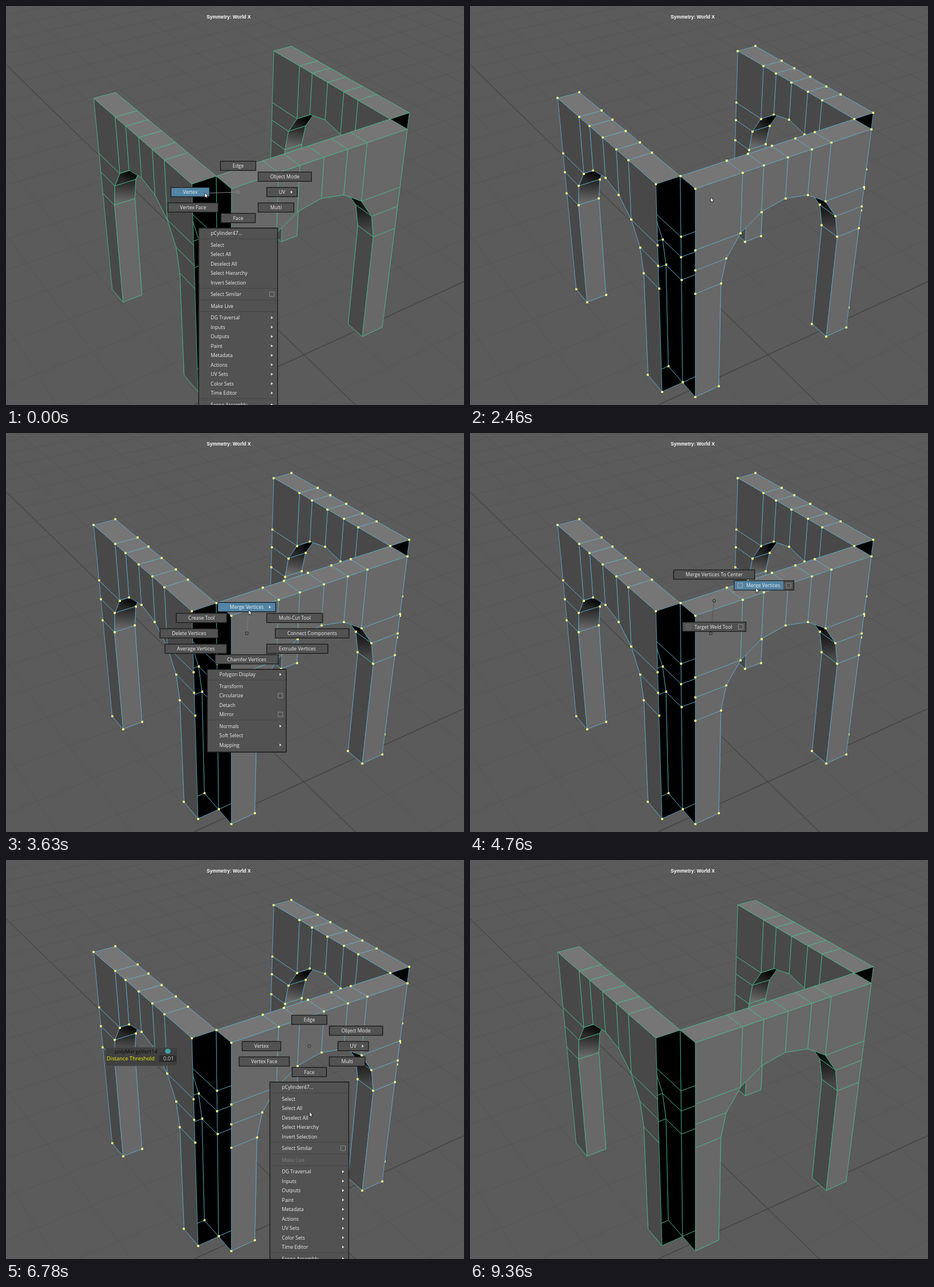
An HTML page with a canvas for the animation above (9.88 s loop, 801x699 px).

```html
<!DOCTYPE html>
<html lang="en">
<head>
<meta charset="utf-8">
<title>Merging vertices</title>
<style>
  html, body { margin: 0; width: 100%; height: 100%; overflow: hidden; background: #5b5b5b; }
  canvas { display: block; }
</style>
</head>
<body>
<canvas id="stage" width="801" height="699"></canvas>
<script>
const ctx = document.getElementById('stage').getContext('2d');
const LOOP = 9880;
const UI_FONT = '"Open Sans", "Noto Sans", sans-serif';
const MENU = '#525252', HOT = '#5285a6';
const grey = level => `rgb(${level},${level},${level})`;

// ---- Drawing helpers ----

function trace(pts, closed) {
  ctx.beginPath();
  pts.forEach(([x, y]) => ctx.lineTo(x, y));
  if (closed) ctx.closePath();
}

function strokeLine(pts, colour, width = 1) {
  trace(pts);
  ctx.strokeStyle = colour;
  ctx.lineWidth = width;
  ctx.stroke();
}

function label(text, x, y, { size = 8.6, colour = '#eee', align = 'left', family = UI_FONT, weight = '' } = {}) {
  ctx.font = `${weight} ${size}px ${family}`;
  ctx.textAlign = align;
  ctx.fillStyle = colour;
  ctx.fillText(text, x, y + size * 0.36);
}

function textWidth(text) {
  ctx.font = `8.6px ${UI_FONT}`;
  return ctx.measureText(text).width;
}

function box(x, y, w, h, fill = MENU) {
  ctx.fillStyle = fill;
  ctx.fillRect(x, y, w, h);
  ctx.strokeStyle = '#191919';
  ctx.lineWidth = 1.3;
  ctx.strokeRect(x, y, w, h);
}

function square(x, y, colour = '#999') {
  ctx.strokeStyle = colour;
  ctx.lineWidth = 0.8;
  ctx.strokeRect(x - 4, y - 4, 8, 8);
}

function arrow(x, y) {
  trace([[x - 1.5, y - 2.6], [x + 1.7, y], [x - 1.5, y + 2.6]], true);
  ctx.fillStyle = '#eee';
  ctx.fill();
}

function ring([x, y], colour = '#222') {
  ctx.beginPath();
  ctx.arc(x, y, 2.6, 0, 7);
  ctx.strokeStyle = colour;
  ctx.lineWidth = 0.9;
  ctx.stroke();
}

// ---- Perspective: an origin plus one vanishing point and rate per axis ----

const AXES = [
  { x: -772, y: -650, rate: 0.1579 },
  { x: 3331, y: -675, rate: 0.09877 },
  { x: 394, y: 2650, rate: -0.15665 }
];
const FRONT_CORNER = [394, 685], GROUND_ORIGIN = [521, 611];

function project(world, [ox, oy] = FRONT_CORNER) {
  let x = ox, y = oy, w = 1;
  AXES.forEach((axis, i) => {
    const k = world[i] * axis.rate;
    x += k * axis.x;
    y += k * axis.y;
    w += k;
  });
  return [x / w, y / w];
}

function drawGrid() {
  const cell = 0.3, near = [-8, -14], far = [45, 50];
  for (const axis of [0, 1]) {
    const other = 1 - axis;
    const line = (i, colour, width) => strokeLine([near, far].map(range => {
      const p = [0, 0, 0];
      p[axis] = range[axis] * cell;
      p[other] = i * cell;
      return project(p, GROUND_ORIGIN);
    }), colour, width);
    for (let i = near[other]; i <= far[other]; i++) line(i, '#535353', 0.8);
    line(0, '#3a3a3a');
  }
}

// ---- Model: three identical arched walls, each of unit length and height ----

const THICK = 0.1235, SEGMENTS = 8;
const SIDE = 72, FRONT = 104, TOP = 118;

function arch(k) {
  const angle = k * Math.PI / SEGMENTS;
  return [0.5 - 0.3565 * Math.cos(angle), 0.538 + 0.2845 * Math.sin(angle)];
}
const foot = k => [arch(k)[0], 0];
const crest = k => [arch(k)[0], 1];
const steps = (from, to) => Array.from({ length: to - from + 1 }, (_, i) => from + i);
const pairs = list => list.slice(1).map((item, i) => [list[i], item]);

const profile = [foot(0), ...steps(0, SEGMENTS).map(arch), foot(SEGMENTS)];
const crestLine = [[0, 1], ...steps(2, 6).map(crest), [1, 1]];

function jamb(edge) {
  const at = k => edge ? SEGMENTS - k : k;
  const column = [foot(at(0)), arch(at(0)), arch(at(1)), arch(at(2)), crest(at(2))];
  return pairs(column).map(([a, b]) => [[edge, a[1]], a, b, [edge, b[1]]]);
}
const spandrels = pairs(steps(2, 6)).map(([a, b]) => [arch(a), arch(b), crest(b), crest(a)]);
const facade = [...jamb(0), ...spandrels, ...jamb(1)];

function wall(place, nearShade, legShade) {
  const quads = [];
  const add = (corners, shade, endShade = shade) =>
    quads.push({ pts: corners.map(c => project(place(...c))), shade, endShade });
  const across = ([a, b], ...shades) =>
    add([[a[0], a[1], 0], [a[0], a[1], 1], [b[0], b[1], 1], [b[0], b[1], 0]], ...shades);
  const face = (depth, shade) =>
    facade.forEach(cell => add(cell.map(([s, h]) => [s, h, depth]), shade));
  // The soffit darkens from the leg up to the crown.
  const soffit = k => legShade * Math.min(1, Math.max(0, (k - 6.3) / 1.7));

  face(1, 0);
  across([[0, 0], foot(0)], 0);
  across([foot(SEGMENTS), [1, 0]], 0);
  pairs(profile).forEach((pair, i) => across(pair, soffit(i - 1), soffit(i)));
  face(0, nearShade);
  pairs(crestLine).forEach(pair => across(pair, TOP));
  return quads;
}

const model = [
  wall((s, h, d) => [THICK + s, 1 + THICK * d, h], SIDE, FRONT),
  wall((s, h, d) => [THICK * d, s, h], FRONT, SIDE),
  wall((s, h, d) => [THICK + s, THICK * (d - 1), h], SIDE, FRONT)
].flat();

function drawQuad({ pts, shade, endShade }, wireColour, dotColour) {
  const [a, b, c, d] = pts;
  const middle = (p, q) => [(p[0] + q[0]) / 2, (p[1] + q[1]) / 2];
  const fill = ctx.createLinearGradient(...middle(a, b), ...middle(c, d));
  fill.addColorStop(0, grey(shade));
  fill.addColorStop(1, grey(endShade));
  trace(pts, true);
  ctx.fillStyle = fill;
  ctx.fill();
  ctx.strokeStyle = wireColour;
  ctx.lineWidth = 0.75;
  ctx.stroke();
  if (!dotColour) return;
  ctx.fillStyle = dotColour;
  pts.forEach(([x, y]) => ctx.fillRect(Math.round(x) - 1.5, Math.round(y) - 1.5, 3.2, 3.2));
}

// ---- Menus ----

// Labels run clockwise from north; a trailing ">" opens a submenu, "#" has an icon and option box.
function radial([cx, cy], labels, hot) {
  labels.forEach((text, i) => {
    if (!text) return;
    const name = text.replace(/[>#]$/, ''), option = text.endsWith('#');
    const width = textWidth(name) + (option ? 45 : 42);
    const side = Math.sign(4 - i) * Math.sign(i);
    const row = Math.min(i, 8 - i) - 2;
    const y = cy + [-46, -27, 0, 27, 45.5][row + 2];
    const gap = row ? 35 : 50;
    const x = cx + (side > 0 ? gap : side < 0 ? -gap - width : -width / 2);
    const isHot = name === hot;
    box(x, y - 8.2, width, 16.4, isHot && !option ? HOT : MENU);
    if (option) {
      if (isHot) {
        ctx.fillStyle = HOT;
        ctx.fillRect(x + 0.7, y - 7.5, width - 19, 15);
      }
      square(x + 10.5, y, isHot ? '#bbb' : '#777');
      strokeLine([[x + 7, y], [x + 14, y]], '#a77', 0.7);
      square(x + width - 9, y);
    }
    label(name, x + (option ? 21 : 21), y);
    if (text.endsWith('>')) arrow(x + width - 10, y);
  });
}

// Rows: "-" is a separator, a trailing ">" opens a submenu, "#" has an option box.
function list(cx, top, height, rows, { hot, dimmed } = {}) {
  const left = cx - 69, width = 138;
  box(left, top, width, height);
  let y = top + 9;
  for (const row of rows) {
    if (row === '-') {
      strokeLine([[left + 1, y - 6.5], [left + width - 1, y - 6.5]], '#444');
      y += 4;
      continue;
    }
    const name = row.replace(/[>#]$/, '');
    if (name === hot) {
      ctx.fillStyle = HOT;
      ctx.fillRect(left + 1, y - 8, width - 2, 16);
    }
    label(name, left + 21, y, { colour: name === dimmed ? '#808080' : '#eee' });
    if (row.endsWith('>')) arrow(left + 128, y);
    if (row.endsWith('#')) square(left + 128, y);
    y += 16.5;
  }
}

const modeItems = ['Edge', 'Object Mode', 'UV>', 'Multi', 'Face', 'Vertex Face', 'Vertex'];
const modeRows = ['pCylinder47...', '-', 'Select', 'Select All', 'Deselect All', 'Select Hierarchy',
  'Invert Selection', '-', 'Select Similar#', '-', 'Make Live', '-', 'DG Traversal>', 'Inputs>', 'Outputs>',
  'Paint>', 'Metadata>', 'Actions>', 'UV Sets>', 'Color Sets>', 'Time Editor>', '-', 'Scene Assembly>'];
const editItems = ['Merge Vertices>', 'Multi-Cut Tool', 'Connect Components', 'Extrude Vertices',
  'Chamfer Vertices', 'Average Vertices', 'Delete Vertices', 'Crease Tool'];
const editRows = ['Polygon Display>', '-', 'Transform', 'Circularize#', 'Detach', 'Mirror#', '-',
  'Normals>', 'Soft Select', 'Mapping>'];
const mergeItems = ['Merge Vertices To Center', 'Merge Vertices#', '', '', 'Target Weld Tool#'];
const EDIT_CENTRE = [421, 351], MERGE_CENTRE = [427, 294];

function modeMenu(cx, hot, pointer, options) {
  const centre = [cx, 326];
  list(cx, 389, 330, modeRows, options);
  if (pointer) strokeLine([centre, pointer], '#858585', 1.2);
  ring(centre, pointer ? '#8a8a8a' : '#333');
  radial(centre, modeItems, hot);
}

function editMenu(pointer, hot) {
  list(EDIT_CENTRE[0], 414, 145, editRows);
  strokeLine([EDIT_CENTRE, pointer], '#777');
  ring(EDIT_CENTRE);
  radial(EDIT_CENTRE, editItems, hot);
}

function mergeMenu(pointer, hot) {
  strokeLine([EDIT_CENTRE, MERGE_CENTRE], '#555');
  strokeLine([MERGE_CENTRE, pointer], '#777');
  ring(EDIT_CENTRE);
  ring(MERGE_CENTRE);
  radial(MERGE_CENTRE, mergeItems, hot);
}

function mergePanel() {
  ctx.fillStyle = 'rgba(62,62,62,.92)';
  ctx.fillRect(174, 328, 126, 33);
  ctx.strokeStyle = '#4a4a4a';
  ctx.lineWidth = 1;
  ctx.strokeRect(174.5, 328.5, 125, 32);
  ctx.fillStyle = '#2d2d2d';
  ctx.fillRect(268, 342, 30, 12);
  label('polyMergeVert14', 190, 335.5, { size: 9.4, colour: '#0a0a0a' });
  label('Distance Threshold', 176, 348, { size: 9.4, colour: '#f4f400' });
  label('0.01', 275, 348, { size: 9.4, colour: '#ccc' });
  ctx.fillStyle = '#3aa5a5';
  ctx.beginPath();
  ctx.ellipse(283, 335, 5, 4.2, 0, 0, 7);
  ctx.fill();
}

// ---- Pointer: each move goes to a place in a number of equal hops ----

const POINTER_START = [348, 328];
const moves = [
  { from: 250, to: 530, hops: 3, place: [421, 336] },
  { from: 3240, to: 3780, hops: 5, place: MERGE_CENTRE },
  { from: 4210, to: 4760, hops: 5, place: [500, 272] },
  { from: 5670, to: 6230, hops: 5, place: [531, 442] },
  { from: 7210, to: 7600, hops: 4, place: [597, 294] },
  { from: 8430, to: 9360, hops: 8, place: [820, 745] }
];

function pointerAt(t) {
  return moves.reduce((at, { from, to, hops, place }) => {
    if (t < from) return at;
    const hop = Math.min(hops, 1 + Math.floor((t - from) / (to - from) * (hops - 1)));
    return at.map((value, i) => value + (place[i] - value) * hop / hops);
  }, POINTER_START);
}

function drawPointer([x, y]) {
  const shape = [[0, 0], [0, 6.8], [1.6, 5.4], [2.7, 7.8], [3.8, 7.3], [2.8, 5], [4.9, 4.8]];
  trace(shape.map(([a, b]) => [x + a, y + b]), true);
  ctx.strokeStyle = '#111';
  ctx.lineWidth = 1.4;
  ctx.stroke();
  ctx.fillStyle = '#fff';
  ctx.fill();
}

function drawModifier(plus) {
  const marks = [[[425, 336], [430, 336]]];
  if (plus) marks.push([[427.5, 333.5], [427.5, 338.5]]);
  marks.forEach(m => strokeLine(m, '#222', 2.2));
  marks.forEach(m => strokeLine(m, '#fff', 1));
}

function draw(t) {
  const during = (from, to) => t >= from && t < to;
  const pointer = pointerAt(t);
  const vertexMode = during(250, 8130);
  const wire = vertexMode ? '#62b5cf' : '#48c492';
  const dots = vertexMode && (t >= 1500 ? '#ffff85' : '#a436a4');

  ctx.lineJoin = 'round';
  ctx.fillStyle = '#5b5b5b';
  ctx.fillRect(0, 0, 801, 699);
  drawGrid();
  model.forEach(quad => drawQuad(quad, wire, dots));
  label('Symmetry: World X', 389.5, 19, {
    size: 8.4, colour: '#fff', align: 'center', weight: 'bold', family: '"Liberation Sans", Arial, sans-serif'
  });

  if (during(5010, 8130)) mergePanel();
  if (t < 250) modeMenu(406, 'Vertex', pointer);
  if (during(2840, 3650)) editMenu(pointer, pointer[1] < 314 && 'Merge Vertices');
  if (during(3650, 5010)) mergeMenu(pointer, pointer[0] > 462 && 'Merge Vertices');
  if (during(6630, 8130)) {
    modeMenu(530.5, t >= 7600 && 'Object Mode', t >= 7340 && pointer,
      { dimmed: 'Make Live', hot: during(7210, 7340) && 'Select' });
  }
  drawPointer(pointer);
  if (during(800, 2050)) drawModifier(during(920, 1910));
}

function frame() {
  draw(performance.now() % LOOP);
  requestAnimationFrame(frame);
}
frame();
</script>
</body>
</html>
```
